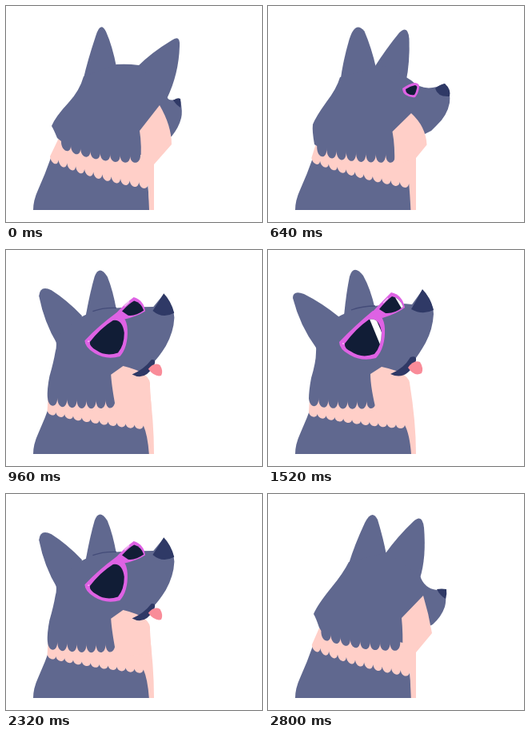
An HTML page with a canvas for the animation above (2880 ms loop, 320 by 270 pixels).

```html
<!DOCTYPE html>
<html lang="en">
<head>
<meta charset="utf-8">
<title>Dog with sunglasses</title>
<style>
html, body { margin: 0; width: 100%; height: 100%; overflow: hidden; background: #fff; }
canvas { display: block; width: 320px; height: 270px; }
</style>
</head>
<body>
<canvas id="stage" width="320" height="270"></canvas>
<script>
const ctx = document.getElementById('stage').getContext('2d');
const LOOP = 2880, STEP = 80;
const NAVY = '#60688f', DARK = '#2f3966', PINK = '#ffcfc8', PURPLE = '#de62e4', LENS = '#111d36';

// Eased position of each step of the head turn
const TURN = [0, 1, 2, 3, 4, 5, 6.3, 7.4, 8];

// Each part: path per key position; numbers are blended in between
const parts = {
  collar: {
    0: '55 188 113 213 178 222 9',
    5: '54 191 113 211 175 222 7',
    8: '51 203 110 215 171 219 6'
  },
  chest: {
    0: 'Q178 235 179 255L185 255Q185 220 185 190L150 160L66 165Z',
    5: 'Q177 235 178 255L185 255Q185 215 185 170L140 170L55 180Z',
    8: 'Q177 230 179 255L185 255Q185 215 177 166L130 170L52 185Z'
  },
  fringe: {
    0: '168 186 117 188 69 169 13',
    5: '154 182 105 184 56 179 18',
    8: '147 185 100 191 51 183 15'
  },
  head: {
    0: 'L64 165Q60 155 57 150Q62 138 78 121Q92 106 97 88L138 73Q152 72 166 74L201 113Q203 119 210 117L218 118Q221 132 219 140Q216 152 207 163L192 170L170 186Z',
    1: 'L64 167Q60 155 57 150Q62 138 80 116Q94 99 101 85L147 73Q148 74 149 73L190 102Q195 118 211 120L222 122Q223 134 221 141Q217 153 206 163L192 170L169 186Z',
    3: 'L58 173Q55 156 56 148Q60 138 73 120Q86 103 90 89L133 77Q142 74 152 76L179 93Q192 106 211 101L221 97Q229 110 227 121Q224 137 211 149Q204 156 196 160L177 165L161 186Z',
    5: 'L55 180Q52 164 56 149Q58 138 68 125Q78 110 80 95L119 84Q135 77 153 82L165 85Q183 92 201 83L214 76Q224 92 224 103Q224 118 211 136Q200 150 185 155L160 160L152 186Z',
    8: 'L51 187Q51 176 54 160Q60 140 60 128Q61 120 57 114L84 86Q97 76 133 70L150 68Q165 66 180 68L193 50Q207 65 207 80Q206 99 197 116Q189 130 182 139L160 165L145 184Z'
  },
  leftEar: {
    0: 'M97 90Q102 68 112 38Q118 18 125 32Q133 50 138 76L120 110Z',
    1: 'M101 87Q108 64 121 36Q130 18 137 32Q144 55 148 76L120 110Z',
    5: 'M80 100Q79 75 82 48Q88 17 104 31Q115 50 122 78L105 115Z',
    8: 'M60 122Q40 95 31 60Q31 50 45 55Q67 66 88 83L92 125Z'
  },
  rightEar: {
    0: 'M164 76Q182 58 207 43Q218 35 217 50Q216 85 201 116L180 120Z',
    1: 'M147 74Q162 53 182 34Q193 24 195 42Q198 80 190 105L170 115Z',
    5: 'M119 79Q134 53 146 33Q157 21 158 40Q157 62 155 84L135 95Z',
    8: 'M95 82Q98 52 102 33Q107 17 119 32Q128 48 134 74L112 90Z'
  },
  brow: {
    5: 'M126 83Q138 78 154 82',
    8: 'M104 75Q118 70 134 70'
  },
  nose: {
    0: 'M209 118Q214 114 218 116Q219 121 218 127Q213 124 209 118Z',
    1: 'M211 119Q217 118 223 119Q224 125 222 131Q215 127 211 119Z',
    3: 'M209 103Q215 98 221 97Q229 104 227 113Q212 114 209 103Z',
    5: 'M201 84Q208 79 214 75Q221 84 223 94Q205 104 201 84Z',
    8: 'M179 74Q186 62 193 49Q203 59 207 75Q193 82 179 74Z'
  },
  cheek: {
    0: 'M192 124L167 156Q170 174 168 198L185 198L207 173Q207 150 192 124Z',
    1: 'M194 127L167 155Q169 175 168 198L185 198L205 174Q201 150 194 127Z',
    5: 'M164 141L144 159Q149 176 148 202L185 182L192 173Q194 152 164 141Z',
    8: 'M142 146L128 155Q128 172 136 204L181 204L177 170Q180 154 142 146Z'
  },
  mouth: {
    3: 'M200 158Q204 156 207 154Q206 157 203 159Q201 160 200 158Z',
    5: 'M176 157Q184 152 196 150Q194 156 186 162Q178 165 176 157Z',
    8: 'M153 155Q170 148 178 134Q188 131 184 141Q172 164 153 155Z'
  },
  tongue: {
    3: 'M204 158Q206 157 207 158Q208 160 207 161Q206 160 204 158Z',
    5: 'M189 156Q199 150 203 160Q205 166 202 169Q198 160 189 156Z',
    8: 'M175 147Q182 137 190 140Q195 148 192 154Q183 159 175 147Z'
  },
  farRim: {
    3: 'M183 96Q186 92 190 95Q192 97 191 99Q188 99 184 98Z',
    5: 'M165 86Q171 80 182 83Q190 90 186 95Q178 96 170 93Z',
    8: 'M129 79Q143 64 154 53Q168 56 171 72Q160 80 143 85Z'
  },
  farLens: {
    3: 'M186 96Q188 95 190 96Q191 97 190 98Q189 98 187 97Z',
    5: 'M169 86Q176 83 181 85Q187 91 185 94Q179 95 175 93Z',
    8: 'M139 74Q148 63 155 58Q165 60 169 71Q158 80 147 79Z'
  },
  rim: {
    3: 'M168 103Q176 97 184 96Q190 97 189 102Q188 109 184 114Q178 115 172 111Q168 108 168 103Z',
    5: 'M136 106Q148 93 166 89Q174 90 175 104Q176 118 172 125Q158 129 146 121Q137 113 136 106Z',
    8: 'M89 115Q108 95 131 76Q145 80 146 98Q147 122 135 135Q117 140 102 131Q89 124 89 115Z'
  },
  lens: {
    3: 'M172 104Q178 100 184 99Q187 100 186 103Q185 108 183 111Q178 112 174 109Q172 107 172 104Z',
    5: 'M140 107Q150 97 165 92Q171 95 171 106Q171 117 168 122Q157 124 148 118Q141 112 140 107Z',
    8: 'M96 117Q110 98 126 87Q139 84 142 103Q142 120 133 130Q117 136 104 127Q95 123 96 117Z'
  },
  sheen: {
    5: 'M139 104L141 102M165 87L171 83',
    8: 'M93 117L95 117M144 66L150 60'
  }
};

function blend(name, u) {
  const track = parts[name];
  const keys = Object.keys(track).map(Number);
  if (u <= keys[0]) return track[keys[0]];
  const i = keys.findIndex(k => k >= u);
  const a = keys[i - 1], b = keys[i], f = (u - a) / (b - a);
  const to = track[b].match(/\d+/g);
  let n = 0;
  return track[a].replace(/\d+/g, v => (+v + (to[n++] - v) * f).toFixed(2));
}

// Row of rounded lobes hanging from a quadratic curve
function lobes(spec, count, inset) {
  const [x0, y0, cx, cy, x1, y1, depth] = spec.split(' ').map(Number);
  const at = t => [
    (1 - t) * (1 - t) * x0 + 2 * t * (1 - t) * cx + t * t * x1,
    (1 - t) * (1 - t) * y0 + 2 * t * (1 - t) * cy + t * t * y1
  ];
  let d = `M${x0} ${y0}`;
  for (let i = 0; i < count; i++) {
    const [ax, ay] = at(i / count), [bx, by] = at((i + 1) / count);
    const pad = (bx - ax) * inset;
    d += `C${ax + pad} ${ay + depth} ${bx - pad} ${by + depth} ${bx} ${by}`;
  }
  return d;
}

function fill(d, color) {
  ctx.fillStyle = color;
  ctx.fill(new Path2D(d));
}

function stroke(d, color) {
  ctx.strokeStyle = color;
  ctx.lineWidth = 1.3;
  ctx.stroke(new Path2D(d));
}

function shine(clip, band, dx) {
  ctx.save();
  ctx.clip(new Path2D(clip));
  ctx.translate(dx, 0);
  fill(band, '#fff');
  ctx.restore();
}

function turnAt(t) {
  if (t < 480) return 0;
  if (t < 1040) return Math.floor((t - 480) / STEP) + 1;
  if (t < 2320) return 8;
  return 7 - Math.floor((t - 2320) / STEP);
}

function draw(t) {
  const u = TURN[turnAt(t)];
  const part = (name, color) => fill(blend(name, u), color);

  ctx.fillStyle = '#fff';
  ctx.fillRect(0, 0, 320, 270);

  fill('M56 190Q49 210 40 230Q34 243 34 255L180 255L176 210Z', NAVY);
  fill(lobes(blend('collar', u), 11, 0.1) + blend('chest', u), PINK);
  part('leftEar', NAVY);
  part('rightEar', NAVY);
  fill(lobes(blend('fringe', u), 8, -0.05) + blend('head', u), NAVY);
  part('cheek', PINK);
  part('nose', DARK);

  if (u >= 4) {
    stroke(blend('brow', u), '#444c79');
    part('mouth', DARK);
    part('tongue', '#f98c99');
    part('farRim', PURPLE);
    part('farLens', LENS);
  }
  if (u >= 3) {
    part('rim', PURPLE);
    part('lens', LENS);
  }
  if (u >= 5) stroke(blend('sheen', u), '#f6c3f6');

  if (t >= 1520 && t < 1920) {
    const k = Math.floor((t - 1520) / STEP);
    shine(parts.lens[8], 'M126 84L134 84L147 114L140 118Z', -9 * k);
    shine(parts.farLens[8], 'M157 56L163 56L172 73L167 73Z', -6 * k);
  }
}

const start = performance.now();
function tick() {
  draw((performance.now() - start) % LOOP);
  requestAnimationFrame(tick);
}
tick();
</script>
</body>
</html>
```
